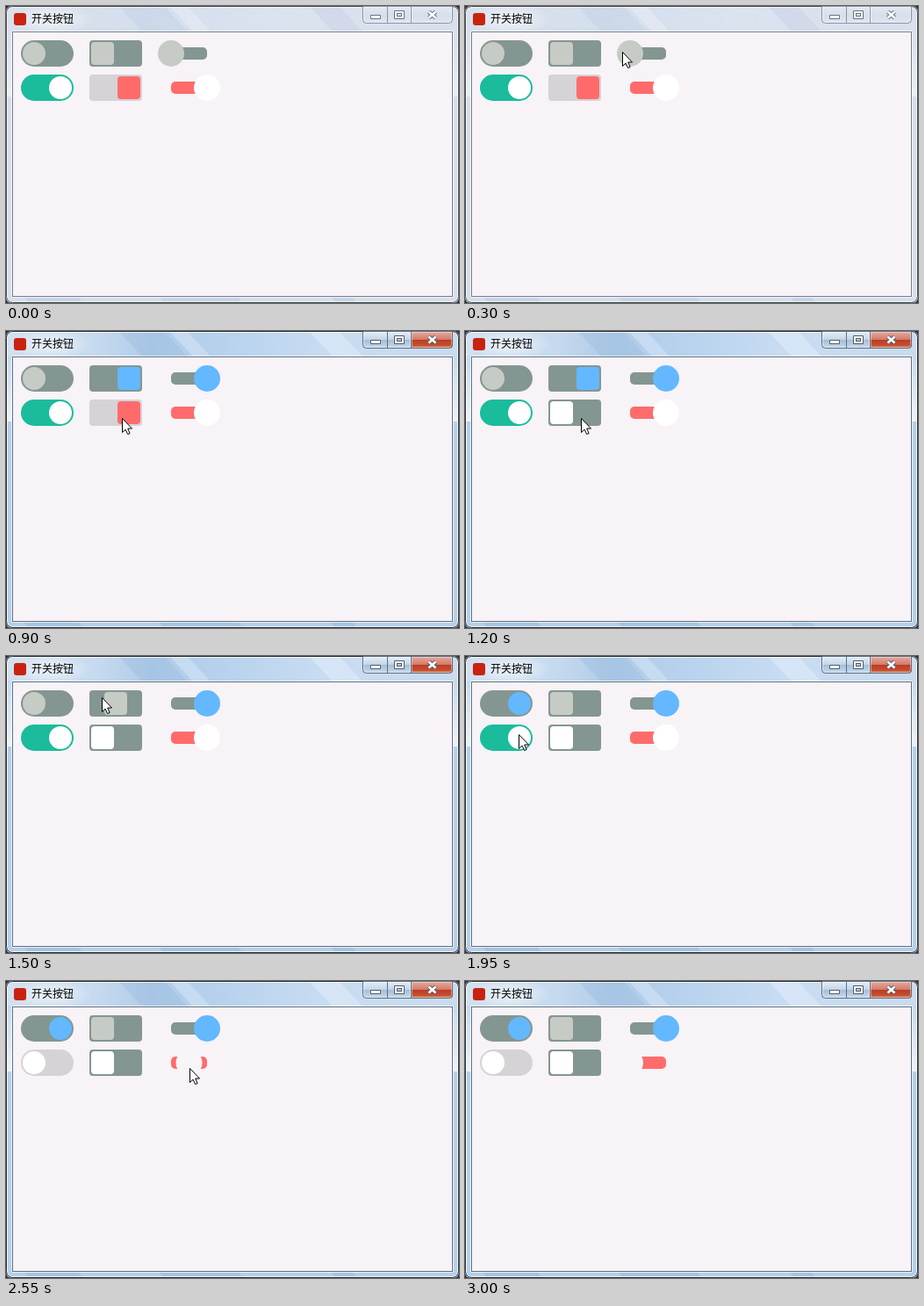
Write an HTML page with a canvas that moves like this. It is 516 px wide and 338 px high and loops after 3450 ms.

```html
<!DOCTYPE html>
<html lang="zh">
<head>
<meta charset="utf-8">
<title>开关按钮</title>
<style>
html, body { margin: 0; width: 100%; height: 100%; overflow: hidden; background: #2b3036; }
canvas { display: block; }
</style>
</head>
<body>
<canvas id="stage" width="516" height="338"></canvas>
<script>
const ctx = document.getElementById('stage').getContext('2d');
const W = 516, H = 338, LOOP = 3450, TICK = 150, SLIDE = 190;
const GRAY = '#849691', PALE = '#c6cbc5', BLUE = '#63b8ff', GREEN = '#1abc9c',
      SILVER = '#d5d3d6', RED = '#ff6b6b', WHITE = '#fff', PAPER = '#f7f3f7';

// Pointer stops: time, x, y; a stop without a place hides the pointer.
const stops = [
  [0], [150, 248, 52], [300, 179, 52], [600, 152, 52], [750, 130, 56],
  [900, 132, 99], [1350, 122, 72], [1500, 109, 47], [1650, 84, 51],
  [1800, 56, 55], [1950, 61, 89], [2250, 61, 92], [2400, 150, 99],
  [2550, 209, 99], [2700, 364, 63], [2850, 467, 36], [3000]
];

function path(x, y, w, h, r) {
  ctx.beginPath();
  ctx.roundRect(x, y, w, h, r);
}

function box(x, y, w, h, r, fill) {
  path(x, y, w, h, r);
  ctx.fillStyle = fill;
  ctx.fill();
}

function line(x, y, w, h, r, color) {
  path(x + 0.5, y + 0.5, w - 1, h - 1, r);
  ctx.strokeStyle = color;
  ctx.lineWidth = 1;
  ctx.stroke();
}

function disc(x, y, r, fill) {
  ctx.beginPath();
  ctx.arc(x, y, r, 0, Math.PI * 2);
  ctx.fillStyle = fill;
  ctx.fill();
}

function poly(points, fill) {
  ctx.beginPath();
  points.forEach(([x, y]) => ctx.lineTo(x, y));
  ctx.closePath();
  ctx.fillStyle = fill;
  ctx.fill();
}

function ramp(x0, y0, x1, y1, list) {
  const g = ctx.createLinearGradient(x0, y0, x1, y1);
  list.forEach(([at, color]) => g.addColorStop(at, color));
  return g;
}

function slide(t, start, from, to) {
  const k = Math.min(1, Math.max(0, (t - start) / SLIDE));
  return from + (to - from) * k;
}

// A slanted glass reflection across the full window height.
function streak(x, w, color) {
  poly([[x, 0], [x + w, 0], [x + w + 28, 30], [x + 28, 30]], color);
}

function glass(active) {
  const base = active ? '#b5cfe9' : '#d5dfec';
  box(0, 0, W, H, [7, 7, 6, 6], base);
  ctx.save();
  path(0, 0, W, H, [7, 7, 6, 6]);
  ctx.clip();
  ctx.fillStyle = ramp(0, 0, W, 0, active
    ? [[0, '#d2e0f0'], [0.2, '#c6daef'], [0.32, '#b0cbe7'], [0.5, '#b9d3ee'], [0.7, '#c8dcf2'], [1, '#c9dbed']]
    : [[0, '#d8e0ec'], [0.3, '#d4dfed'], [0.6, '#dae3f0'], [1, '#d9e0ec']]);
  ctx.fillRect(0, 0, W, 30);
  streak(128, 52, active ? 'rgba(150,184,220,.35)' : 'rgba(190,204,224,.35)');
  streak(186, 20, active ? 'rgba(225,238,252,.4)' : 'rgba(235,240,248,.5)');
  streak(345, 34, active ? 'rgba(235,243,253,.4)' : 'rgba(200,206,226,.45)');

  const side = ramp(0, 28, 0, 104, active
    ? [[0, '#c5d9ee'], [0.6, '#dce8f5'], [1, '#edf4fb']]
    : [[0, '#d6dfec'], [0.6, '#e1e8f2'], [1, '#eaf0f7']]);
  [0, 509].forEach(x => {
    ctx.fillStyle = side;
    ctx.fillRect(x, 28, 7, 75);
  });
  const tint = active ? 'rgba(140,178,216,.4)' : 'rgba(185,200,220,.45)';
  [[20, 62], [174, 90], [370, 24]].forEach(([x, w]) =>
    poly([[x, 331], [x + w, 331], [x + w + 6, 338], [x + 6, 338]], tint));

  const glow = ctx.createRadialGradient(0, 0, 6, 0, 0, 46);
  glow.addColorStop(0, 'rgba(255,255,255,.6)');
  glow.addColorStop(1, 'rgba(255,255,255,0)');
  ctx.translate(52, 15);
  ctx.scale(1, 0.38);
  ctx.fillStyle = glow;
  ctx.fillRect(-50, -50, 100, 100);
  ctx.restore();

  line(1, 1, W - 2, H - 2, 6, active ? 'rgba(255,255,255,.8)' : 'rgba(255,255,255,.65)');
  line(0, 0, W, H, 7, active ? '#272d34' : '#454a50');
}

function captionButtons(active) {
  const edge = active ? '#5d7084' : '#8794a4';
  const face = active
    ? [[0, '#e3edf7'], [0.45, '#c5d6e8'], [0.5, '#a6bfd8'], [1, '#c8dcef']]
    : [[0, '#e3e9f2'], [0.5, '#d7dfea'], [1, '#dfe6f0']];
  const hot = active
    ? [[0, '#e5aa9d'], [0.45, '#d47b69'], [0.5, '#bd3d25'], [0.8, '#c44f31'], [1, '#e3a06f']]
    : face;
  box(406, 1, 56, 19, [0, 0, 0, 4], ramp(0, 1, 0, 20, face));
  box(462, 1, 47, 19, [0, 0, 4, 0], ramp(0, 1, 0, 20, hot));
  line(407, 1, 54, 18, [0, 0, 0, 3], 'rgba(255,255,255,.5)');
  line(462, 1, 46, 18, [0, 0, 3, 0], 'rgba(255,255,255,.4)');
  line(406, 0, 103, 20, [0, 0, 4, 4], edge);
  ctx.fillStyle = edge;
  ctx.fillRect(434, 1, 1, 18);
  ctx.fillRect(461, 1, 1, 18);

  const ink = active ? '#515c6a' : '#687380';
  box(415, 10, 12, 5, 1, ink);
  box(416, 11, 10, 3, 0, WHITE);
  box(442, 5, 12, 10, 1, ink);
  box(443, 6, 10, 8, 0, WHITE);
  box(445, 8, 6, 4, 0, ink);
  box(446, 9, 4, 2, 0, active ? '#b7cce1' : '#dce4ee');

  [[4.6, ink], [2.6, WHITE]].forEach(([w, color]) => {
    ctx.beginPath();
    ctx.moveTo(481.5, 6.5);
    ctx.lineTo(489.5, 13.5);
    ctx.moveTo(489.5, 6.5);
    ctx.lineTo(481.5, 13.5);
    ctx.strokeStyle = color;
    ctx.lineWidth = w;
    ctx.stroke();
  });
}

function frame(active) {
  ctx.fillStyle = '#2b3036';
  ctx.fillRect(0, 0, W, H);
  glass(active);
  captionButtons(active);
  box(9, 8, 14, 14, 3, '#c9230f');
  ctx.fillStyle = '#000';
  ctx.font = '12px "Noto Sans CJK SC", "Noto Sans CJK", sans-serif';
  ctx.fillText('开关按钮', 29, 19);
  line(6, 28, 504, 304, 1, 'rgba(255,255,255,.7)');
  box(7, 29, 502, 302, 0, active ? '#5f7081' : '#747e8a');
  box(8, 30, 500, 300, 0, PAPER);
}

function pill(y, x, track, knob) {
  box(17, y, 60, 30, 15, track);
  disc(x, y + 15, 13, knob);
}

function square(y, x, track, knob) {
  box(95, y, 60, 30, 4, track);
  box(x, y + 2, 26, 26, 4, knob);
}

function bar(y, x, track, knob) {
  box(188, y + 8, 41, 14, 5, track);
  disc(x, y + 15, 15, knob);
}

function switches(t) {
  const pillOn = t >= 1705, pillOff = t >= 2155;
  const squareOn = t >= 655 && t < 1405, squareOff = t >= 955;
  const squareX = t < 1405 ? slide(t, 655, 97, 127) : slide(t, 1405, 127, 97);

  pill(39, slide(t, 1705, 32, 62), GRAY, pillOn ? BLUE : PALE);
  square(39, squareX, GRAY, squareOn ? BLUE : PALE);
  bar(39, slide(t, 408, 188, 229), GRAY, t >= 408 ? BLUE : PALE);

  pill(78, slide(t, 2155, 62, 32), pillOff ? SILVER : GREEN, WHITE);
  square(78, slide(t, 955, 127, 97), squareOff ? GRAY : SILVER, squareOff ? WHITE : RED);
  bar(78, slide(t, 2455, 229, 188), RED, t >= 2455 ? '#f8f5f8' : WHITE);
}

function pointer(t) {
  const [, x, y] = stops.filter(s => s[0] <= t).pop();
  if (x === undefined) return;
  ctx.save();
  ctx.translate(x + 0.5, y + 0.5);
  poly([[0, 0], [0, 16], [3.6, 12.6], [6.2, 18], [8.6, 17], [6.2, 11.5], [11, 11.5]], WHITE);
  ctx.strokeStyle = '#000';
  ctx.lineWidth = 1;
  ctx.stroke();
  ctx.restore();
}

function draw(now) {
  const t = Math.min(3000, Math.floor((now % LOOP) / TICK) * TICK);
  frame(t >= 450);
  switches(t);
  pointer(t);
}

const begin = performance.now();
function tick() {
  draw(performance.now() - begin);
  requestAnimationFrame(tick);
}
tick();
</script>
</body>
</html>
```
